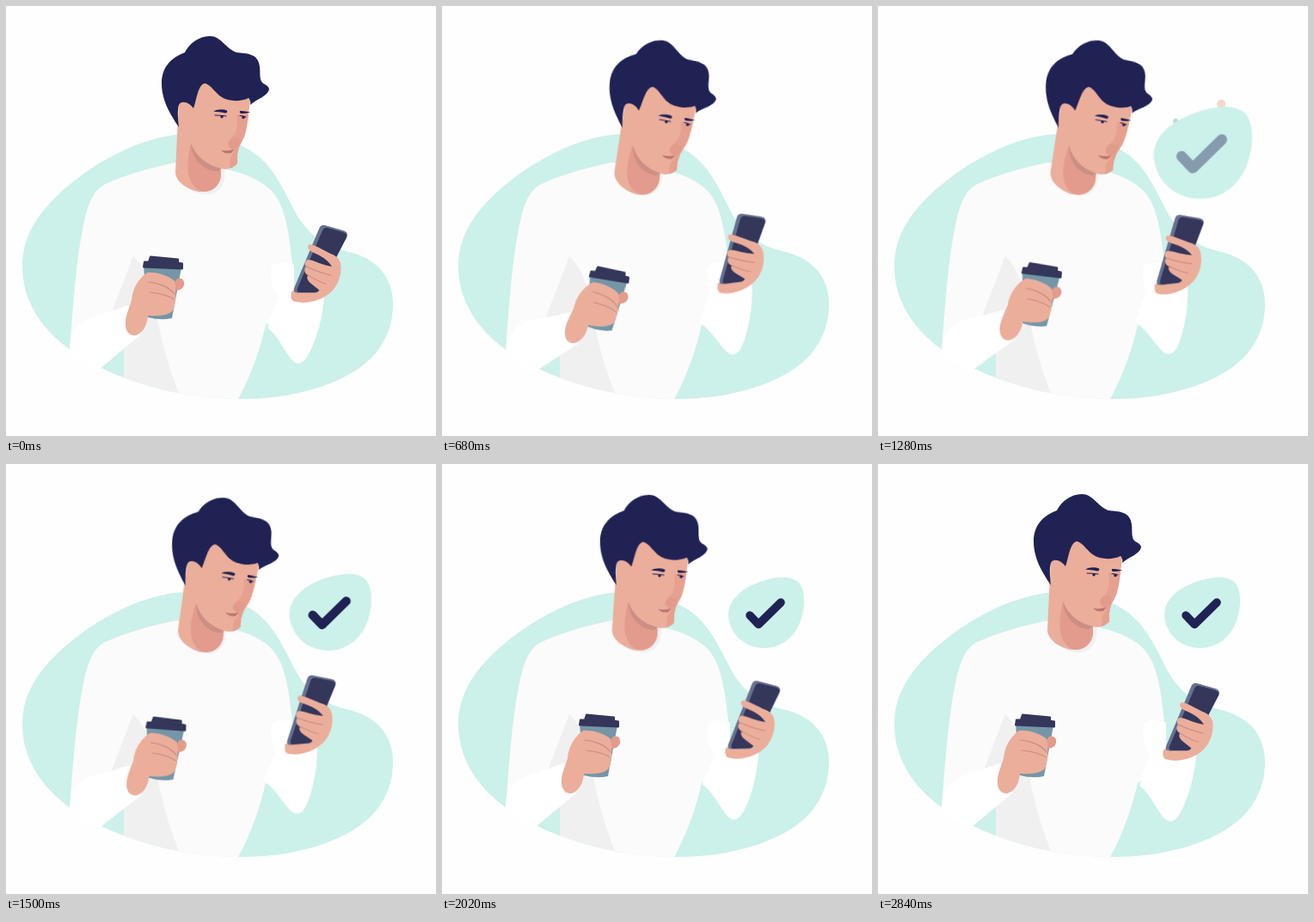
Recreate the animation shown at these times as an HTML page. Size 500 by 500 pixels, loop 3620 ms.

```html
<!DOCTYPE html>
<html lang="en">
<head>
<meta charset="utf-8">
<title>Man with coffee and phone</title>
<style>
  html, body { margin: 0; width: 100%; height: 100%; overflow: hidden; background: #fefefe; }
  svg { display: block; width: 100vw; height: 100vh; }
  .mint { fill: #ccf0ea; }
  .shirt { fill: #fbfbfb; }
  .sleeve { fill: #fff; }
  .shade { fill: #f0f0f0; }
  .skin { fill: #ebae9b; }
  .blush { fill: #e39b8d; }
  .navy { fill: #202254; }
  .dark { fill: #34365a; }
  .crease { fill: none; stroke: #c98a82; stroke-width: 1.1; stroke-linecap: round; }
  .lash { fill: none; stroke: #202254; stroke-width: 1; stroke-linecap: round; }
</style>
</head>
<body>
<svg viewBox="0 0 500 500">
  <path class="mint" d="M205 149C150 153 95 187 60 220C33 246 19 272 19 303C19 345 44 378 75 400C120 432 195 457 272 457C335 457 393 440 424 410C443 391 450 368 450 347C450 315 431 293 396 285C370 279 354 267 340 246C322 214 311 180 275 163C255 152 225 148 205 149Z"/>

  <!-- torso -->
  <path class="shirt" d="M198 182C170 187 130 199 112 209C98 218 93 240 89 260C81 300 78 350 74 399L137 390V432C160 440 180 446 201 450C225 455 250 457 270 457C285 430 297 395 302 370L335 340L333 300C329 260 324 230 308 214C293 200 272 193 253 189Z"/>
  <path class="shade" d="M148 291L121 361L137 380V432C160 440 180 446 201 450C190 423 182 395 177 368C174 345 168 310 148 291Z"/>
  <g id="collar">
    <path class="shade" d="M206 205C215 218 230 221 241 218C252 213 256 202 254 188L230 180Z"/>
  </g>

  <!-- arm with phone -->
  <path class="sleeve" d="M309 303C315 296 328 298 335 301V345L302 372C308 362 312 350 317 338C310 329 306 315 309 303Z"/>
  <g id="forearm">
    <path class="sleeve" d="M322 338L352 322L370 337C369 362 359 394 350 408C345 415 340 418 334 413C325 405 319 386 304 374Z"/>
  </g>
  <g id="phone">
    <path class="skin" d="M332 332C331 338 331 341 334 343C345 347 362 344 372 337C384 330 390 315 389 300L375 295L350 325Z"/>
    <path fill="#66718f" d="M371 255L392 261Q399 263 396 269L365 329Q363 333.5 359 333.5H339Q333 333 335 328L364 259Q366 254 371 255Z"/>
    <path class="dark" d="M374 258L392 263Q398 265 396 269L365 329Q363 333 359 333H342Q337 333 339 328L368 261Q370 257 374 258Z"/>
    <path class="skin" d="M353 277C349 280 351 284 358 287C367 291 374 295 379 303C369 302 357 295 351 295C347 296 347 301 349 303C346 306 347 311 351 313C349 316 351 320 355 323L365 331C361 335 362 338 368 339C382 333 390 318 389.5 303C389 296 386 292 380 289C370 285 361 278 353 277Z"/>
    <path class="crease" d="M349 303C358 307 367 311 378 313M351 313C358 317 364 321 372 323"/>
  </g>

  <!-- head -->
  <g id="head">
    <path class="skin" d="M201 113L199 150L197 193C197 203 209 213 224 216C238 217 248 210 250 198L250 189C258 191 264 188 269 183L269 173L271 164L277 152C280 143 282 127 284 109L255 90H225Z"/>
    <path class="blush" d="M215 160C211 176 210 192 214 202C217 210 223 215 230 216C240 216 249 209 250 197V189C233 185 221 175 215 160Z"/>
    <path fill="#cb8f84" d="M215 160C216 176 228 192 246 192L250 189C234 185 222 177 215 160Z"/>
    <path class="blush" d="M268 127C270 140 268 148 262 154C257 158 257 163 262 166L265 170L261 176L260 189Q265 188 269 183L269 173L271 164L277 152C280 144 281 134 282 126Z" opacity=".75"/>
    <path fill="#df978a" d="M264 153C258 156 256 162 261 165C264 167 268 165 270 163L272 155Z" opacity=".65"/>
    <path fill="#ba766f" d="M250 167.5C255 169 260 168 265 166.5L262 171C257 172 253 171 250 167.5Z"/>
    <path class="navy" d="M241 122.5C246 120 252 119.500 257 121.500Q258 124 255 124.500C250 123.500 246 123 241 122.500ZM272 122Q277 121.500 284 123.500Q278 125.500 273 125Q271 124 272 122Z"/>
    <path class="lash" d="M243 127Q250 127 256 128M272 127.500Q275 127.500 279 129"/>
    <circle class="navy" cx="251" cy="128.800" r="1.700"/>
    <circle class="navy" cx="276" cy="129.500" r="1.700"/>
    <path class="navy" d="M201 141C192 127 181 111 181 90C181 71 192 60 208 54C213 44 224 35 237 35C250 35 255 49 268 54C281 55 291 56 294 66C297 75 293 85 299 90C303 92 306 94 306 97C304 105 292 108 284 115Q285 110 282 107C274 111 263 111 255 108C244 104 239 91 231 90C223 92 222 108 218 119C213 112 204 109 201 115C199 122 200 132 201 141Z"/>
  </g>

  <!-- arm with cup -->
  <g id="cup">
    <path class="sleeve" d="M74 400C75 380 82 368 100 362C115 357 128 353 142 348L156 383C143 393 125 409 110 421C95 418 80 411 74 400Z"/>
    <path fill="#7496a6" d="M160 302L204 304L193 363Q180 366 165 362Z"/>
    <path class="dark" stroke="#34365a" stroke-width="2" stroke-linejoin="round" d="M168 291.500L200 294.500V298.500L205 299.500V305.500L160 303.500L161 297.500L166 297.500Z"/>
    <path class="blush" d="M199 317C204 315 208 319 207 324C206 329 201 332 196 330Q194 322 199 317Z"/>
    <path class="skin" d="M164 310C154 317 147 329 146 342C143 353 138 361 139 372C140 381 146 384.500 152 382.500C160 379 164 371 165 360C176 361 189 360 194 354C198 347 198 326 196 320C190 314 175 309 164 310Z"/>
    <path class="crease" d="M166 321C178 322 190 327 196 335M168 333C178 334 188 336 195 341"/>
  </g>

  <!-- confirmation bubble -->
  <circle id="dotA" cx="399" cy="114" r="5" fill="#ebae9b"/>
  <circle id="dotB" cx="346" cy="134" r="3" fill="#6fb5ac"/>
  <g id="bubble">
    <path class="mint" d="M333 177C332 155 355 140 380 134C396 130 408 131 415 138C424 148 422 172 415 187C407 204 392 214 375 214C352 214 335 198 333 177Z"/>
    <path id="tick" d="M358 176L368 186.500L394 161" fill="none" stroke="#202254" stroke-width="9.500" stroke-linecap="round" stroke-linejoin="round"/>
  </g>
</svg>
<script>
const LOOP = 3620;
const bez = (...p) => `cubic-bezier(${p})`;

// steps: [time, value, easing to the next step]; the last value holds until the loop ends
function play(id, origin, steps, style) {
  const el = document.getElementById(id);
  el.style.transformOrigin = origin;
  const frames = steps.map(([t, v, easing = "linear"]) => ({ offset: t / LOOP, easing, ...style(v) }));
  frames.push({ ...frames[frames.length - 1], offset: 1 });
  el.animate(frames, { duration: LOOP, iterations: Infinity });
}

const turn = deg => v => ({ transform: `rotate(${v * deg}deg)` });
const grow = v => ({ transform: `scale(${v})` });
const fade = v => ({ opacity: v });

const back = bez(.25, 0, .17, 1);
const nod = [[0, 0, bez(.3, 0, .6, 1)], [760, 1], [1290, 1, back], [2800, 0]];
const lift = [[0, 0, bez(.4, 0, .6, 1)], [800, 1], [1260, 1, back], [2840, 0]];
const hold = [[0, 0, bez(.3, 0, .67, 1)], [700, 1], [960, 1, bez(.33, 0, .3, 1)], [2840, 0]];
const sip = [[0, 0, bez(.4, 0, .6, 1)], [760, 1], [950, 1, bez(.3, 0, .4, 1)], [1980, 0]];

const neck = "198px 227px";
play("head", neck, nod, turn(6));
play("collar", neck, nod, turn(3));
play("forearm", "245px 418px", lift, turn(-6.6));
play("phone", "256px 418px", hold, turn(-7.4));
play("cup", "75px 408px", sip, turn(7));

const center = "374.5px 180px";
play("bubble", center, [[0, 0], [1040, 0, bez(.3, 0, .5, 1)], [1270, 1.3, bez(.4, 0, .4, 1)], [1690, 1]], grow);
play("tick", center, [[0, 0], [1180, 0], [1430, 1]], fade);

// dots fly out of the bubble while fading
for (const id of ["dotA", "dotB"])
  play(id, center, [[0, 0], [1060, 0, "ease-out"], [1280, 1], [1460, 1.2]],
    v => ({ transform: `scale(${v})`, opacity: v > 1 ? 0 : v * .48 }));
</script>
</body>
</html>
```
